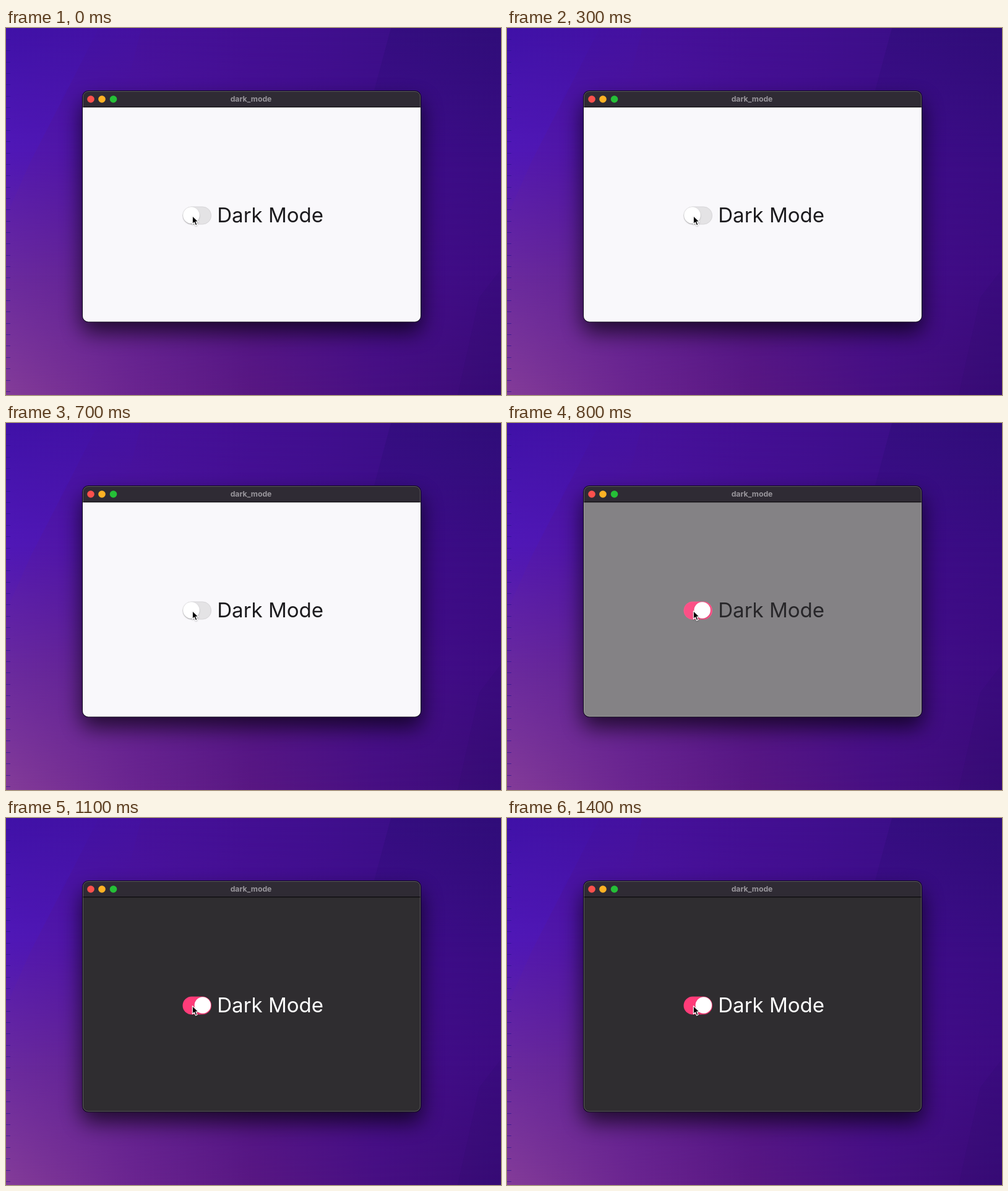
An HTML page for the animation above (1500 ms loop, 800 by 593 pixels).

```html
<!DOCTYPE html>
<html lang="en">
<head>
<meta charset="utf-8">
<title>dark_mode</title>
<style>
  html, body { margin: 0; width: 100%; height: 100%; overflow: hidden; background: #430f93; }
  svg { display: block; width: 100vw; height: 100vh; }
  text { font-family: Inter, "Open Sans", sans-serif; }
</style>
</head>
<body>
<svg viewBox="0 0 800 593" preserveAspectRatio="none">
  <defs>
    <linearGradient id="fadeFacet" x1="0" y1="0" x2="0" y2="1">
      <stop offset="0" stop-color="#fff"/>
      <stop offset=".6" stop-color="#fff"/>
      <stop offset="1" stop-color="#fff" stop-opacity="0"/>
    </linearGradient>
    <linearGradient id="blueFacet" x1="0" y1="0" x2="0" y2="1">
      <stop offset="0" stop-color="#3f12b4" stop-opacity=".3"/>
      <stop offset=".6" stop-color="#4a16c4" stop-opacity=".35"/>
      <stop offset="1" stop-color="#4a16c4" stop-opacity=".05"/>
    </linearGradient>
    <linearGradient id="topFacet" x1="0" y1="0" x2="0" y2="1">
      <stop offset="0" stop-color="#3f12b4" stop-opacity=".22"/>
      <stop offset="1" stop-color="#3f12b4" stop-opacity="0"/>
    </linearGradient>
    <linearGradient id="darkFacet" x1="0" y1="0" x2="0" y2="1">
      <stop offset="0" stop-color="#1e0a66" stop-opacity=".26"/>
      <stop offset="1" stop-color="#1e0a66" stop-opacity="0"/>
    </linearGradient>
    <filter id="soft" x="-30%" y="-30%" width="160%" height="160%">
      <feGaussianBlur stdDeviation="17"/>
    </filter>
    <filter id="knobShade" x="-30%" y="-30%" width="160%" height="160%">
      <feDropShadow dx="0" dy="1" stdDeviation="1" flood-opacity=".25"/>
    </filter>
    <filter id="arrowShade" x="-50%" y="-50%" width="200%" height="200%">
      <feDropShadow dx="0" dy="1" stdDeviation="1" flood-opacity=".3"/>
    </filter>
    <clipPath id="frame"><rect x="124" y="102" width="546" height="372.5" rx="9"/></clipPath>
  </defs>

  <g id="wall"></g>
  <polygon points="0,0 150,0 112,75 40,215 0,305" fill="url(#blueFacet)"/>
  <polygon points="0,0 219,0 195,95 102,95 150,0" fill="url(#topFacet)"/>
  <polygon points="622,0 800,0 800,230 560,230" fill="url(#darkFacet)"/>
  <polygon points="800,390 765,435 730,593 800,593" fill="#1e0a5c" opacity=".1"/>
  <path id="ticks" stroke="#2a1690" stroke-opacity=".65"/>

  <rect x="122" y="118" width="550" height="374" rx="14" opacity=".66" filter="url(#soft)"/>
  <rect x="123" y="101" width="548" height="374.5" rx="10" fill="#0c0618"/>
  <g clip-path="url(#frame)">
    <rect x="124" y="102" width="546" height="26" fill="#2f2b34"/>
    <rect id="page" x="124" y="128" width="546" height="347"/>
    <rect x="124" y="127" width="546" height="1.3" fill="#0b090d"/>
  </g>
  <rect x="124.5" y="102.5" width="545" height="371.5" rx="8.5" fill="none" stroke="#fff" stroke-opacity=".22"/>

  <circle cx="137" cy="115" r="5.8" fill="#fb504d"/>
  <circle cx="155" cy="115" r="5.8" fill="#fdb225"/>
  <circle cx="173.5" cy="115" r="5.8" fill="#25bf37"/>
  <text x="396" y="118.5" font-size="12.2" font-weight="700" text-anchor="middle" fill="#98959b">dark_mode</text>

  <rect id="track" x="285.5" y="288.5" width="46.5" height="29" rx="14.5"/>
  <rect id="rim" x="286" y="289" width="45.5" height="28" rx="14" fill="none" stroke="#d3d2d5"/>
  <circle id="knob" cy="302.5" r="13.2" fill="#fff" filter="url(#knobShade)"/>
  <text id="label" x="341.3" y="314.3" font-size="33">Dark Mode</text>

  <path d="M301.3 303.6v13.2l3-2.8 2.2 5 2.4-1-2.1-4.9h4.2z" stroke="#fff" stroke-width="1.1"
        stroke-linejoin="round" filter="url(#arrowShade)"/>
</svg>
<script>
const $ = id => document.getElementById(id);
const LOOP = 1500, STEP = 100;

// Wallpaper: colour rows that fade into each other downwards
const rows = [
  [0, '#4011a2 #46119c #430f93 #3d0f8a #360e80'],
  [200, '#5318b0 #4d139e #460f92 #3f0c8a #390c83'],
  [400, '#6a2a9e #5f2090 #501488 #440e8a #3d0b82'],
  [593, '#843c98 #6b2590 #581782 #470f82 #390b77']
];

function paintWall() {
  const stops = list => list.split(' ').map((c, i) => `<stop offset="${i / 4}" stop-color="${c}"/>`).join('');
  $('wall').innerHTML = rows.map(([y, list], i) => {
    const from = i ? rows[i - 1][0] : 0;
    const fade = i ? `<linearGradient id="v${i}" gradientUnits="userSpaceOnUse" x1="0" y1="${from}" x2="0" y2="${y}">
        <stop stop-color="#fff" stop-opacity="0"/><stop offset="1" stop-color="#fff"/></linearGradient>
      <mask id="m${i}" maskUnits="userSpaceOnUse" x="0" y="0" width="800" height="593" style="mask-type:alpha">
        <rect width="800" height="593" fill="url(#v${i})"/></mask>` : '';
    return `${fade}<linearGradient id="h${i}">${stops(list)}</linearGradient>
      <rect width="800" height="593" fill="url(#h${i})"${i ? ` mask="url(#m${i})"` : ''}/>`;
  }).join('');

  let d = '';
  for (let i = 0; i < 32; i++) d += `M0 ${Math.round(18 + i * 18.35) + 0.5}h7`;
  $('ticks').setAttribute('d', d);
}

// Linear interpolation through [time, value] keys
function at(keys, t) {
  if (t <= keys[0][0]) return keys[0][1];
  for (let i = 1; i < keys.length; i++) {
    const [t0, a] = keys[i - 1], [t1, b] = keys[i];
    if (t <= t1) return a + (b - a) * (t - t0) / (t1 - t0);
  }
  return keys[keys.length - 1][1];
}

const mix = (a, b, p) => `rgb(${a.map((v, i) => Math.round(v + (b[i] - v) * p))})`;

const pageKeys = [[700, 0], [800, 0.58], [900, 1]];
const textKeys = [[700, 0], [800, 0.05], [900, 0.27], [1000, 0.8], [1100, 1]];
const knobKeys = [[700, 0], [800, 0.88], [900, 1]];

function draw(t) {
  const slide = at(knobKeys, t);
  $('page').setAttribute('fill', mix([249, 248, 251], [47, 45, 48], at(pageKeys, t)));
  $('label').setAttribute('fill', mix([28, 27, 30], [255, 255, 255], at(textKeys, t)));
  $('track').setAttribute('fill', mix([228, 227, 229], [255, 60, 121], slide));
  $('rim').setAttribute('stroke-opacity', 0.7 * (1 - slide));
  $('knob').setAttribute('cx', 299.4 + 18.4 * slide);
}

function tick() {
  const t = performance.now() % LOOP;
  draw(Math.floor(t / STEP) * STEP);
  requestAnimationFrame(tick);
}

paintWall();
tick();
</script>
</body>
</html>
```
